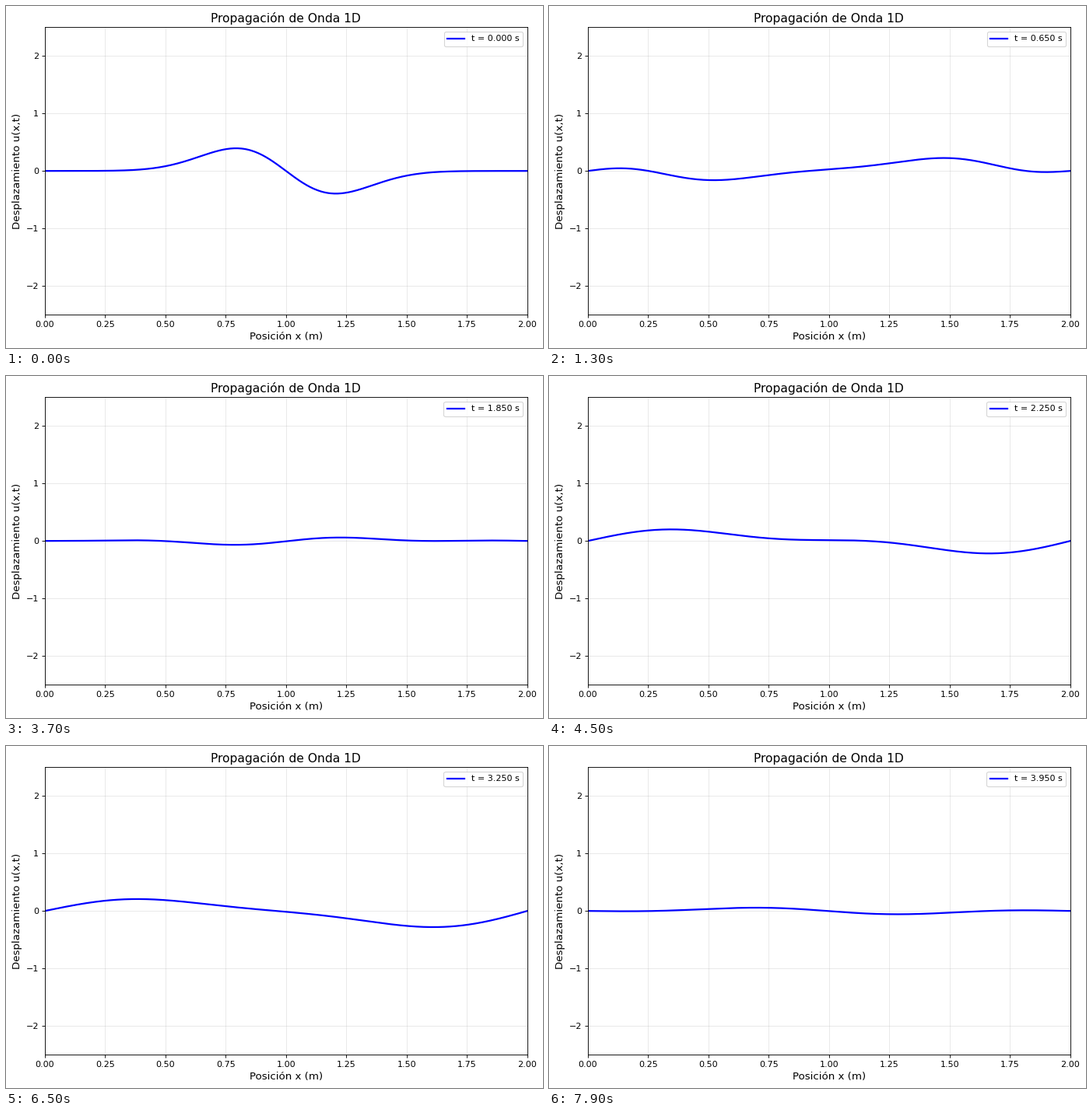
These frames come from a looping animation (690 by 440 pixels, 8 s). A matplotlib script:

```python
import numpy as np
import matplotlib.pyplot as plt
from matplotlib.animation import FuncAnimation

# Damped, driven string with fixed ends:
#   u_tt = C^2 u_xx + ETA u_xxt + sin(pi x - OMEGA t)
W, H, DPI = 690, 440, 80
FRAMES, INTERVAL, DT = 80, 100, 0.05
L, C, ETA, OMEGA = 2.0, 2.0, 0.02, 2 * np.pi
MODES = 30

plt.rcParams["font.family"] = "DejaVu Sans"

x = np.linspace(0, L, 401)
k = np.arange(1, MODES + 1) * np.pi / L
shapes = np.sin(np.outer(k, x))


def project(f):
    """Sine-series coefficients of f on the string."""
    s = np.linspace(0, L, 4001)
    return 2 / L * (np.sin(np.outer(k, s)) * f(s)).sum(axis=1) * (s[1] - s[0])


start = project(lambda s: np.exp(-10 * (s - 1) ** 2) * np.sin(np.pi * s))
drive = project(lambda s: np.sin(np.pi * s)) + 1j * project(lambda s: np.cos(np.pi * s))

# Each mode: forced response plus a decaying free oscillation, starting at rest
rate = ETA * k**2 / 2
freq = np.sqrt((C * k) ** 2 - rate**2)
forced = drive / ((C * k) ** 2 - OMEGA**2 + 2j * rate * OMEGA)
cos_amp = start - forced.real
sin_amp = (rate * cos_amp + OMEGA * forced.imag) / freq


def wave(t):
    free = np.exp(-rate * t) * (cos_amp * np.cos(freq * t) + sin_amp * np.sin(freq * t))
    return (free + (forced * np.exp(1j * OMEGA * t)).real) @ shapes


fig = plt.figure(figsize=(W / DPI, H / DPI), dpi=DPI, facecolor="white")
ax = fig.add_axes([49.75 / W, 43 / H, 620 / W, 369.6 / H])
ax.set_xlim(0, L)
ax.set_ylim(-2.5, 2.5)
ax.set_title("Propagación de Onda 1D", fontsize=14)
ax.set_xlabel("Posición x (m)", fontsize=12)
ax.set_ylabel("Desplazamiento u(x,t)", fontsize=12)
ax.grid(True, alpha=0.3)

line, = ax.plot(x, wave(0), color="blue", lw=2, label="t = 0.000 s")
label = ax.legend(loc="upper right", fontsize=10).get_texts()[0]


def update(i):
    t = i * DT
    line.set_ydata(wave(t))
    label.set_text(f"t = {t:.3f} s")
    return line, label


anim = FuncAnimation(fig, update, frames=FRAMES, interval=INTERVAL,
                     repeat=True, repeat_delay=0, blit=False)
plt.show()
```
